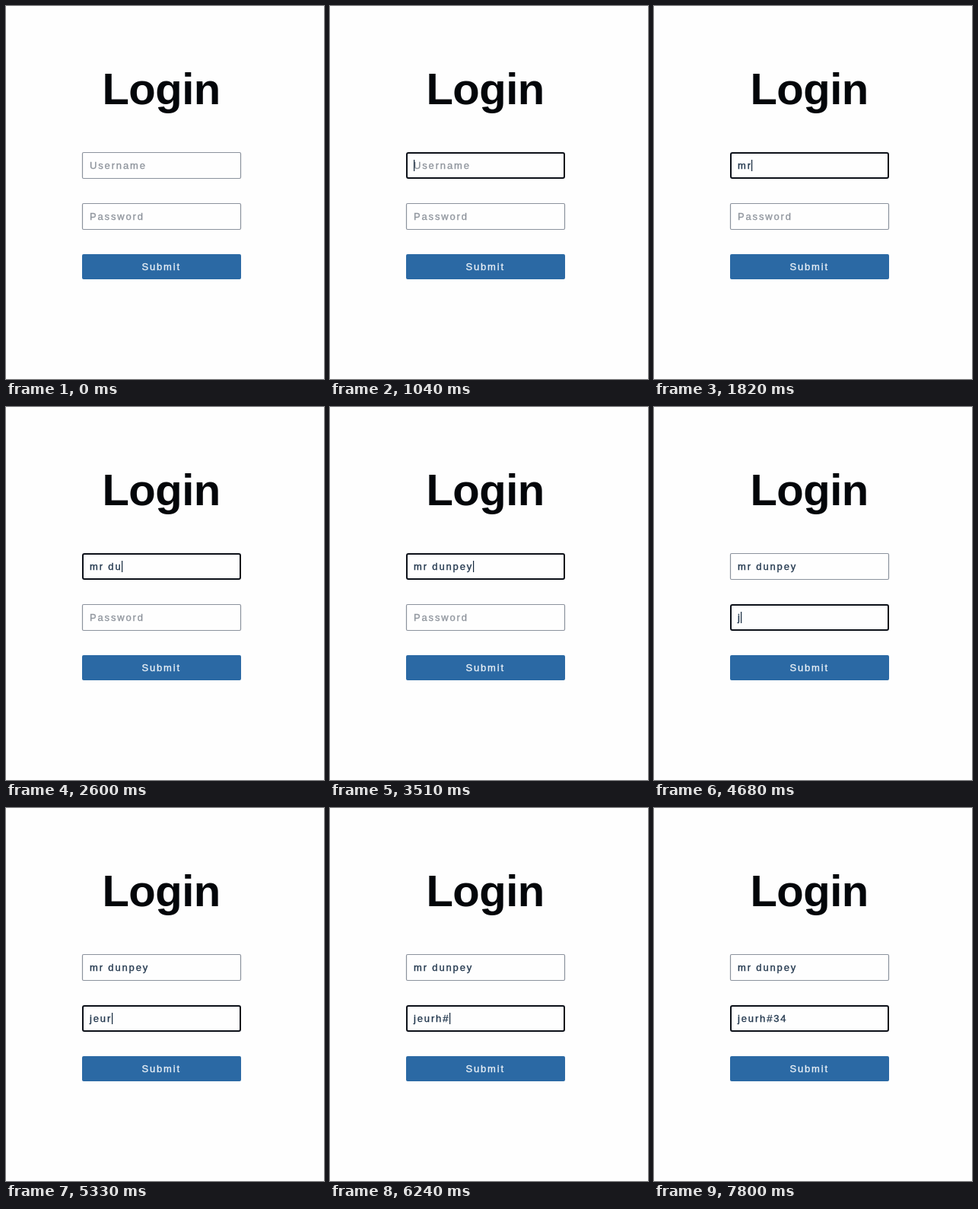
Animation, 418 px wide and 490 px high, one loop 8 s. Source, as an HTML page:

```html
<!DOCTYPE html>
<html lang="en">
<head>
<meta charset="utf-8">
<title>Login</title>
<style>
  html, body { margin: 0; width: 100%; height: 100%; overflow: hidden; background: #fefefe; }
  svg { display: block; filter: blur(0.4px); }
  text {
    font: 13px "Liberation Sans", Arial, sans-serif; letter-spacing: 1.85px; white-space: pre;
    fill: currentColor; stroke: currentColor; stroke-width: 0.35; color: #24394f;
  }
  .title { font-size: 58px; font-weight: bold; letter-spacing: -0.5px; stroke: none; color: #03060a; }
  .box { fill: #fefefe; stroke: #8b929d; stroke-width: 1.2; }
  .focused .box { stroke: #0c1018; stroke-width: 2; }
  .empty text { color: #90969e; }
  .caret { fill: #14283c; }
  .button rect { fill: #2b69a4; }
  .button text { color: #e6eef5; }
</style>
</head>
<body>
<svg width="418" height="490" viewBox="0 0 418 490">
  <text class="title" x="126.4" y="129">Login</text>
  <g id="username" transform="translate(100 192)"></g>
  <g id="password" transform="translate(100 259)"></g>
  <g class="button">
    <rect x="100" y="326" width="209" height="33" rx="2"/>
    <text x="178.4" y="347">Submit</text>
  </g>
</svg>
<script>
const DURATION = 8000;
const TEXT_X = 10;

// Key times are the moments at which each character appears.
const fields = [
  {
    id: "username", placeholder: "Username", value: "mr dunpey",
    keys: [1430, 1690, 1950, 2210, 2600, 2860, 3120, 3380, 3510],
    focus: 910, blur: 4160, caretOff: 4030
  },
  {
    id: "password", placeholder: "Password", value: "jeurh#34",
    keys: [4680, 4940, 5200, 5330, 5590, 6240, 6760, 7150],
    focus: 4160, blur: DURATION, caretOff: 7800
  }
];

for (const field of fields) {
  field.group = document.getElementById(field.id);
  field.group.innerHTML = `
    <rect class="box"/>
    <text x="${TEXT_X}" y="22"></text>
    <rect class="caret" y="10" width="1.2" height="15"/>`;
  field.box = field.group.querySelector(".box");
  field.text = field.group.querySelector("text");
  field.caret = field.group.querySelector(".caret");
}

function setAttributes(element, attributes) {
  for (const [name, value] of Object.entries(attributes)) element.setAttribute(name, value);
}

function drawField(field, time) {
  const typed = field.keys.filter(key => key <= time).length;
  const focused = time >= field.focus && time < field.blur;
  const inset = focused ? 1 : 0.5;

  field.group.classList.toggle("focused", focused);
  field.group.classList.toggle("empty", typed === 0);
  setAttributes(field.box, {
    x: inset, y: inset, width: 209 - 2 * inset, height: 35 - 2 * inset, rx: focused ? 2 : 1.5
  });

  field.text.textContent = typed ? field.value.slice(0, typed) : field.placeholder;
  const offset = typed ? field.text.getComputedTextLength() : 0;
  setAttributes(field.caret, {
    x: Math.round(TEXT_X + offset - 0.4),
    visibility: focused && time < field.caretOff ? "visible" : "hidden"
  });
}

function draw(now) {
  const time = now % DURATION;
  for (const field of fields) drawField(field, time);
  requestAnimationFrame(draw);
}

draw(0);
</script>
</body>
</html>
```
